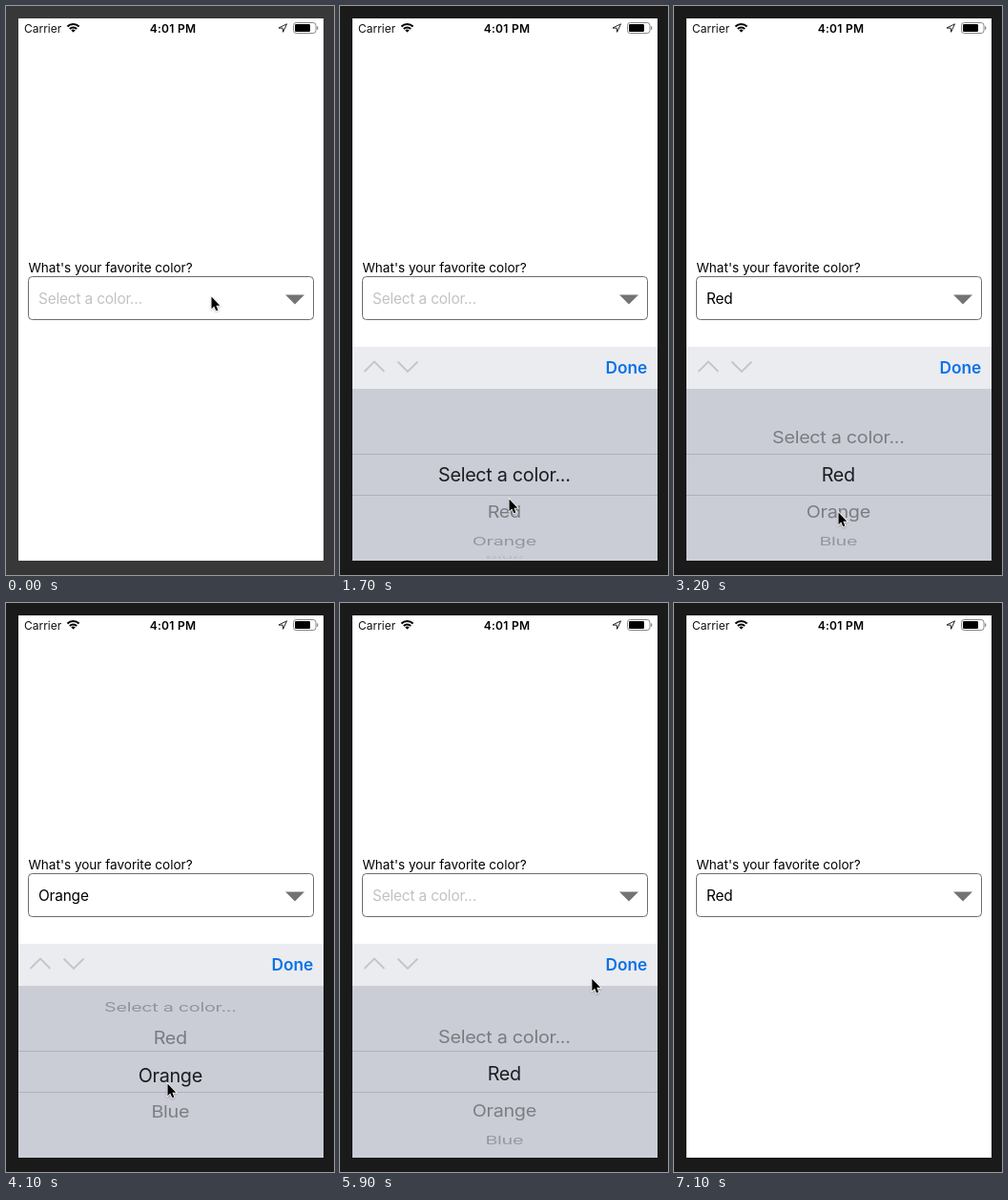
Write an HTML page with a canvas that moves like this. It is 344 px wide and 596 px high and loops after 8 s.

```html
<!DOCTYPE html>
<html lang="en">
<head>
<meta charset="utf-8">
<title>Color picker</title>
<style>
  html, body { margin: 0; width: 100%; height: 100%; overflow: hidden; background: #1a1a1a; }
  canvas { display: block; }
</style>
</head>
<body>
<canvas id="stage" width="344" height="596"></canvas>
<script>
const ctx = document.getElementById('stage').getContext('2d');
const LOOP = 8000, STEP = 100;
const ROWS = ['Select a color...', 'Red', 'Orange', 'Blue'];
const SHEET = 224;                              // height of toolbar plus wheel
const MID = 491, RADIUS = 88.3, TURN = 0.457;   // wheel centre, radius, angle per row
const ARROW = new Path2D('M.5.5V13.2L3.3 10.5 5.3 15.3 7.4 14.4 5.4 9.7H9.3Z');

const SPINS = [
  { from: 2000, to: 2600, row: 1 },
  { from: 3200, to: 3600, row: 2 },
  { from: 4000, to: 4800, row: 0 },
  { from: 5300, to: 6000, row: 1 },
];

function ease(t, from, to) {
  const u = Math.min(1, Math.max(0, (t - from) / (to - from)));
  return u * u * (3 - 2 * u);
}

// Share of the way left for a critically damped spring
function spring(ms) {
  const w = Math.max(0, ms) * 0.0244;
  return (1 + w) * Math.exp(-w);
}

const wheelPos = t => SPINS.reduce((pos, s) => pos + (s.row - pos) * ease(t, s.from, s.to), 0);

// The field takes the row of the last finished spin
const chosenRow = t => SPINS.reduce((row, s) => t >= s.to ? s.row : row, 0);

function pointerPos(t) {
  let x = 215, y = 304;
  const glide = (toX, toY, from, to) => {
    const u = ease(t, from, to);
    x += (toX - x) * u;
    y += (toY - y) * u;
  };
  glide(177, 516, 900, 1700);
  glide(172, 530, 2700, 3200);
  glide(166, 476, 3700, 4500);
  glide(166, 431, 5000, 5500);
  glide(303, 378, 5350, 6200);
  return [x, y];
}

function text(str, x, y, size, color, { weight = 400, align = 'left', spacing = 0 } = {}) {
  ctx.font = `${weight} ${size}px Inter, sans-serif`;
  ctx.letterSpacing = spacing + 'px';
  ctx.textAlign = align;
  ctx.fillStyle = color;
  ctx.fillText(str, x, y);
}

function rect(x, y, w, h, color) {
  ctx.fillStyle = color;
  ctx.fillRect(x, y, w, h);
}

function stroke(path, color, width) {
  ctx.strokeStyle = color;
  ctx.lineWidth = width;
  ctx.stroke(path);
}

function fill(path, color) {
  ctx.fillStyle = color;
  ctx.fill(path);
}

function box(x, y, w, h, r) {
  const path = new Path2D();
  path.roundRect(x, y, w, h, r);
  return path;
}

function clipped(areas, draw) {
  ctx.save();
  ctx.beginPath();
  areas.forEach(a => ctx.rect(...a));
  ctx.clip();
  draw();
  ctx.restore();
}

function statusBar() {
  text('Carrier', 19, 27.5, 12, '#111');
  text('4:01 PM', 175, 27.5, 12, '#000', { weight: 600, align: 'center', spacing: .25 });

  for (const r of [1.6, 5.2, 8.6]) {
    const arc = new Path2D();
    arc.arc(70.5, 27.6, r, -Math.PI * .75, -Math.PI * .25);
    stroke(arc, '#000', r < 2 ? 3 : 2);
  }
  stroke(new Path2D('M286 23 294.5 18.8 290.6 27.3 290.2 23.2Z'), '#222', 1);

  stroke(box(301.5, 17.5, 23.5, 11, 2.8), '#888', 1);
  fill(box(303, 19, 16, 8, 1.2), '#000');
  fill(box(326, 21.2, 1.3, 3.6, .6), '#888');
}

function field(t) {
  const row = chosenRow(t);
  text("What's your favorite color?", 23.5, 279, 13.6, '#000', { spacing: -.03 });
  stroke(box(23.5, 283.5, 299, 45, 4), '#6c6c6c', 1);
  text(ROWS[row], 34, 311.7, 15.4, row ? '#000' : '#c2c2c5', { spacing: -.17 });
  fill(new Path2D('M293 302.5H313L303 312.5Z'), '#737373');
}

function wheelRows(pos, colorAt) {
  ROWS.forEach((row, i) => {
    const angle = (i - pos) * TURN, depth = Math.cos(angle);
    if (Math.abs(angle) > 1.5) return;
    ctx.save();
    ctx.translate(172.3, MID + RADIUS * Math.sin(angle));
    ctx.scale(1, depth);
    text(row, 0, 7.2, 19.8, colorAt(depth), { align: 'center', spacing: -.3 });
    ctx.restore();
  });
}

function sheet(t) {
  const drop = SHEET * (t < 5000 ? spring(t - 420) : 1 - spring(t - 6150));
  if (drop > SHEET - .5) return;
  ctx.save();
  ctx.translate(0, Math.round(drop));

  rect(13, 357, 320, 44, '#ebecf0');
  stroke(new Path2D('M25.5 383 36 372.5 46.5 383M60.5 372.5 71 383 81.5 372.5'), '#c4c5c9', 1.8);
  text('Done', 322, 384.6, 17.3, '#0b72e7', { weight: 600, align: 'right', spacing: -.1 });

  rect(13, 401, 320, 180, '#cacdd5');
  const pos = wheelPos(t);
  clipped([[13, 401, 320, 68], [13, 513, 320, 68]],
    () => wheelRows(pos, depth => `rgba(0,0,0,${.44 * depth})`));
  clipped([[13, 470, 320, 42]], () => wheelRows(pos, () => '#1b1c20'));
  for (const y of [469, 512]) rect(13, y, 320, 1, '#afb2b9');
  ctx.restore();
}

function pointer(t) {
  if (t >= 7100) return;
  ctx.save();
  ctx.translate(...pointerPos(t));
  ctx.shadowColor = 'rgba(0,0,0,.25)';
  ctx.shadowBlur = 2;
  ctx.shadowOffsetY = 1;
  stroke(ARROW, '#fff', 1.6);
  ctx.shadowColor = 'transparent';
  fill(ARROW, '#000');
  ctx.restore();
}

function draw(t) {
  const shade = Math.max(26, 56 - t / 10);
  rect(0, 0, 344, 596, `rgb(${shade},${shade},${shade})`);
  rect(13, 13, 320, 568, '#fff');
  clipped([[13, 13, 320, 568]], () => {
    statusBar();
    field(t);
    sheet(t);
  });
  pointer(t);
}

let start;
function tick(now) {
  start ??= now;
  draw(Math.floor((now - start) % LOOP / STEP) * STEP);
  requestAnimationFrame(tick);
}
requestAnimationFrame(tick);
</script>
</body>
</html>
```
